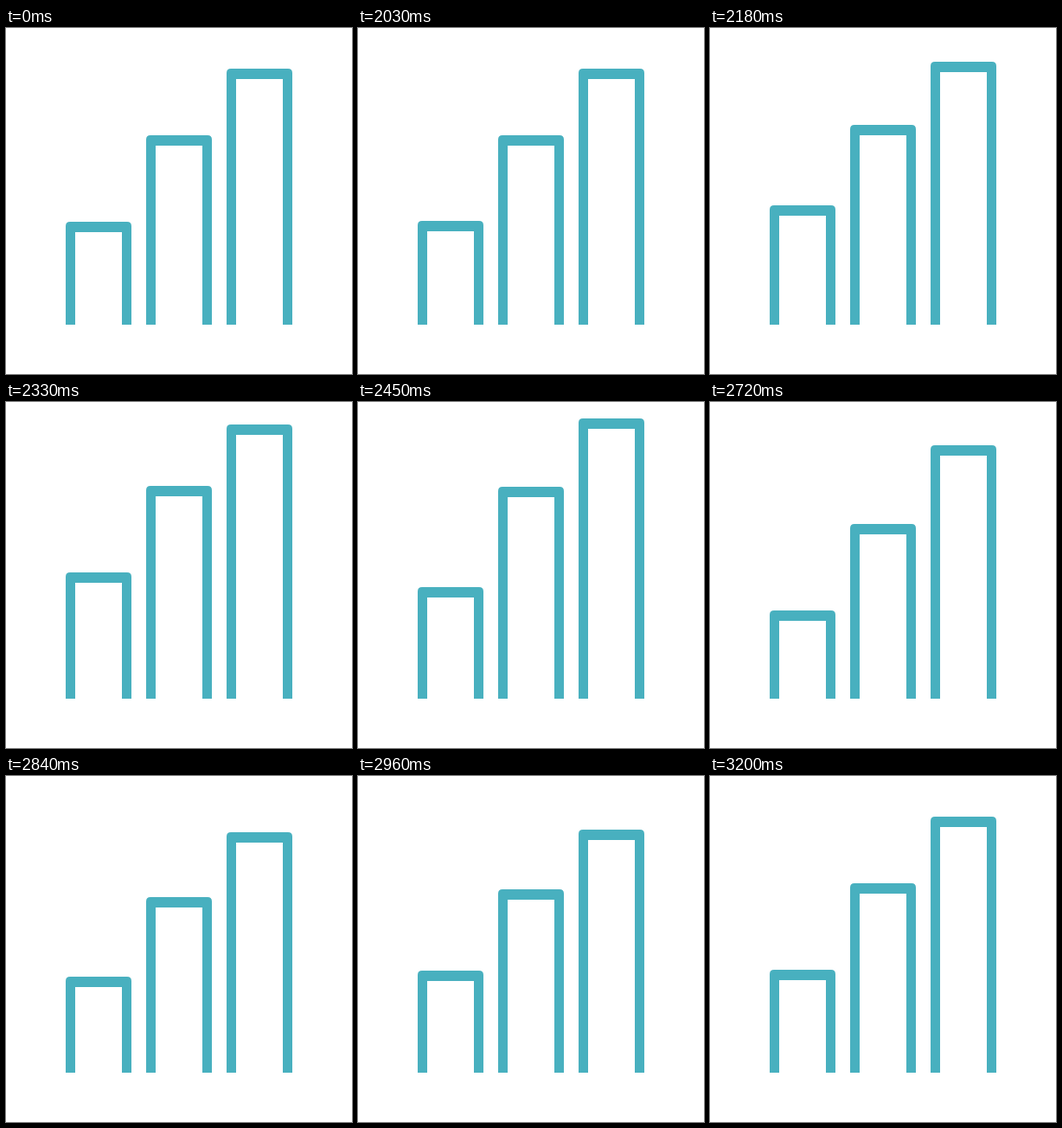
These frames come from a looping animation (400x400 px, 3.23 s). An HTML page:

```html
<!DOCTYPE html>
<html lang="en">
<head>
<meta charset="utf-8">
<title>Bouncing bars</title>
<style>
  html, body { margin: 0; width: 100%; height: 100%; overflow: hidden; background: #fff; }
  svg { display: block; width: 100vw; height: 100vh; }
  path { fill: #48b0bf; }
</style>
</head>
<body>
<svg viewBox="0 0 400 400">
  <path/><path/><path/>
</svg>
<script>
  const LOOP = 3230, START = 2000, STEP = 30;
  const RISE = 28.25, DIP = 18;
  const bars = [
    { x: 69, top: 224, lag: 0 },
    { x: 162, top: 124, lag: 100 },
    { x: 255, top: 47, lag: 200 }
  ];
  const paths = document.querySelectorAll('path');

  const ease = u => (1 - Math.cos(Math.PI * Math.min(1, Math.max(0, u)))) / 2;
  const mix = (a, b, u) => a + (b - a) * ease(u);

  // All bars leave together; the lag stretches the rise and delays the rest.
  function offset(s, lag) {
    const peak = 292 + lag, low = 662 + lag, end = 1000 + lag;
    if (s < peak) return mix(0, -RISE, s / peak);
    if (s < low) return mix(-RISE, DIP, (s - peak) / (low - peak));
    return mix(DIP, 0, (s - low) / (end - low));
  }

  const outline = (x, y) =>
    `M${x} 343V${y + 5}q0 -5 5 -5h66q5 0 5 5V343h-11V${y + 12}h-54V343z`;

  function draw(t) {
    const s = Math.floor((t % LOOP - START) / STEP) * STEP;
    bars.forEach(({ x, top, lag }, i) => {
      const y = Math.round(top + offset(s, lag));
      paths[i].setAttribute('d', outline(x, y));
    });
  }

  const t0 = performance.now();
  function tick() {
    draw(performance.now() - t0);
    requestAnimationFrame(tick);
  }
  tick();
</script>
</body>
</html>
```
